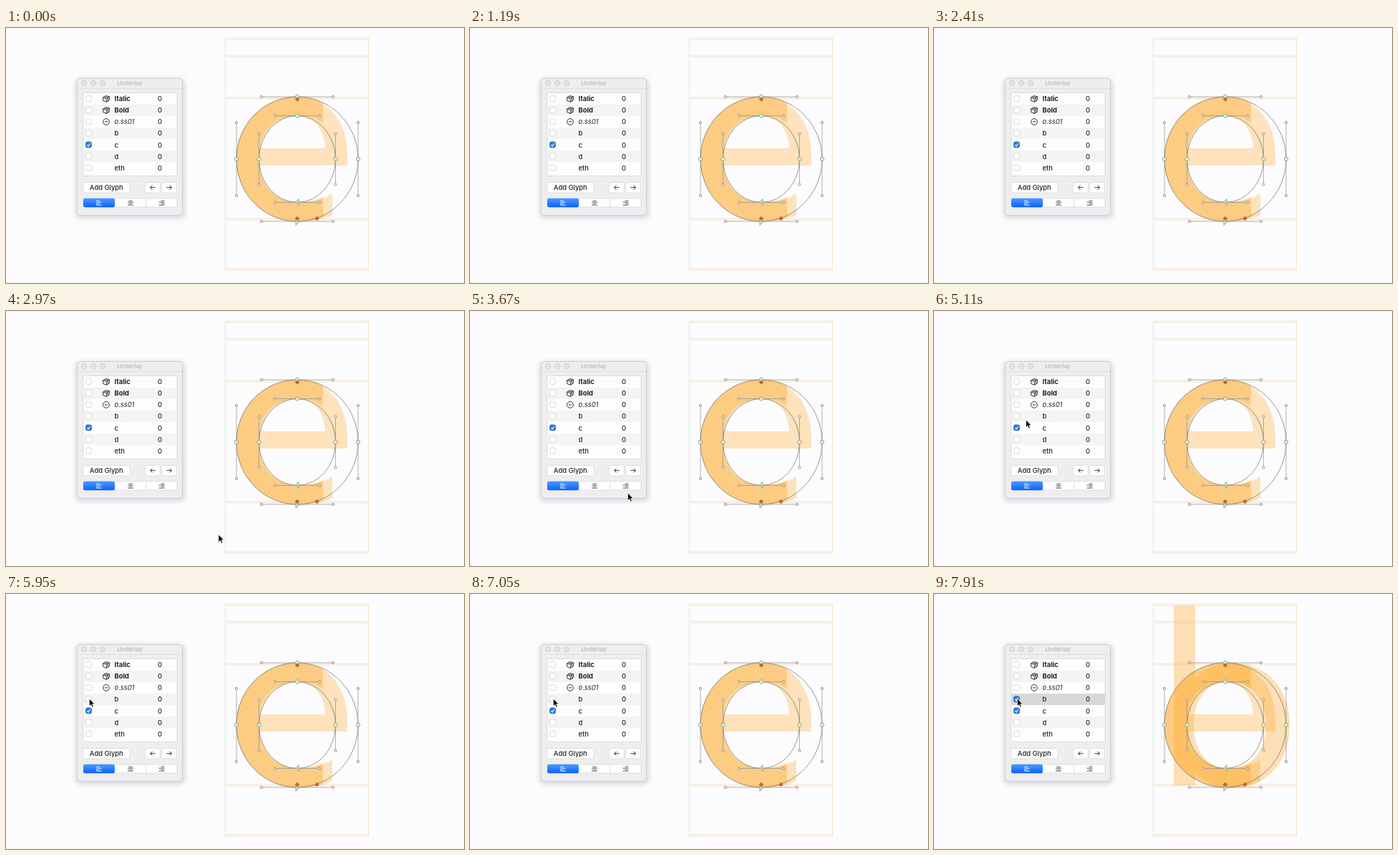
These frames come from a looping animation (640 by 356 pixels, 8000 ms). An HTML page:

```html
<!DOCTYPE html>
<html lang="en">
<head>
<meta charset="utf-8">
<title>Glyph underlay</title>
<style>
html, body { margin: 0; width: 100%; height: 100%; overflow: hidden; background: #fcfcfe; }
svg { display: block; width: 100%; height: 100%; }
text { font: 500 9.4px Inter, "Open Sans", sans-serif; fill: #222; }
.bold { font-weight: 700; }
.italic { font-style: italic; font-weight: 400; }
.title { font-size: 8.2px; fill: #b6b6b8; }
.line { fill: none; stroke: #6c6a68; stroke-width: .7; }
.handle { fill: none; stroke: #92908e; stroke-width: .7; }
.icon { fill: none; stroke: #333; stroke-width: 1; stroke-linejoin: round; }
</style>
</head>
<body>
<svg viewBox="0 0 640 356">
  <defs>
    <linearGradient id="blue" x2="0" y2="1">
      <stop stop-color="#4c9bff"/><stop offset="1" stop-color="#0a63fa"/>
    </linearGradient>
    <filter id="soft" x="-10%" y="-10%" width="120%" height="120%"><feGaussianBlur stdDeviation="3"/></filter>
  </defs>
  <rect width="640" height="356" fill="#fcfcfe"/>
  <g id="guides"></g>
  <g fill="#fda827">
    <path opacity=".31" fill-rule="evenodd" d="M477 192V178C477 128 449 96 407 96C360 96 322 135 322 183S360 270 407 270C426 270 443 268 456 261V231C442 240 427 243 407 243C379 243 356 224 354 192ZM354 168H446C445 141 431 123 405 123C378 123 357 141 354 168Z"/>
    <path opacity=".38" d="M443 104C432 99 420 96 407 96C360 96 322 135 322 183S360 270 407 270C421 270 433 268 443 264V236C433 241 421 243 407 243C377 243 353.500 217 353.500 183S377 122.500 407 122.500C422 122.500 434 126 443 133Z"/>
    <path id="b" opacity=".34" fill-rule="evenodd" d="M335 16H365V119C378 104 396 96 416 96C465 96 497 132 497 183S465 271 416 271C395 271 377 263 365 247V267H335ZM413 122C383 122 363 146 363 183S383 244 413 244S464 219 464 183S443 122 413 122Z"/>
  </g>
  <g id="outline"></g>
  <g id="panel"></g>
  <path id="cursor" d="M0 0V10.800L2.500 8.500L4.200 12.200L6 11.400L4.400 7.800H7.700Z" fill="#000" stroke="#fff" stroke-width=".8" stroke-linejoin="round"/>
</svg>
<script>
const LOOP = 8000, CLICK = 7620;
const $ = id => document.getElementById(id);

function add(parent, tag, attrs, text) {
  const el = document.createElementNS("http://www.w3.org/2000/svg", tag);
  for (const k in attrs) el.setAttribute(k, attrs[k]);
  if (text !== undefined) el.textContent = text;
  parent.appendChild(el);
  return el;
}
const rect = (parent, x, y, width, height, fill, rest) =>
  add(parent, "rect", { x, y, width, height, fill, ...rest });
const circle = (parent, cx, cy, r, fill, stroke, width = 1) =>
  add(parent, "circle", { cx, cy, r, fill, stroke, "stroke-width": width });
const path = (parent, d, cls) => add(parent, "path", { d, class: cls });

function drawGuides() {
  const g = $("guides");
  for (const y of [0, 355]) rect(g, 0, y, 640, 1, "#f7f7f4");
  for (const y of [13, 37.5, 96, 265, 335]) rect(g, 306, y, 201, 4, "#f8efe6");
  for (const x of [306, 506]) rect(g, x, 13, 1, 326, "#f6e3c8");
}

function drawOutline() {
  const g = $("outline"), cx = 407, cy = 183;
  const green = (x, y) => circle(g, x, y, 2.7, "#eef4e6cc", "#6fae8c", .9);
  const handle = (x, y, dx, dy) => {
    path(g, `M${x - dx} ${y - dy}L${x + dx} ${y + dy}`, "handle");
    for (const s of [-1, 1]) circle(g, x + s * dx, y + s * dy, 1.6, "#fcfcfc", "#777", .8);
  };
  const arrow = (x, y, s) =>
    add(g, "path", { d: `M${x - 2 * s} ${y}L${x + 2 * s} ${y - 4.5}V${y + 4.5}Z`, fill: "#d5e4c4", stroke: "#6fae8c", "stroke-width": .9 });

  for (const [rx, ry, hx, hy] of [[85, 87, 50, 51], [53.5, 60.5, 31, 35.5]]) {
    add(g, "ellipse", { cx, cy, rx, ry, class: "line" });
    for (const s of [-1, 1]) {
      handle(cx, cy + s * ry, hx, 0);
      handle(cx + s * rx, cy, 0, hy);
      green(cx + s * rx, cy);
    }
    green(cx, cy - ry);
  }
  arrow(cx, 243, 1);
  arrow(cx, 271, -1);
  for (const [x, y] of [[407, 99.5], [407, 266], [434.5, 266]])
    add(g, "path", { d: `M${x} ${y - 3.3}l3.300 3.300l-3.300 3.300l-3.300-3.300z`, fill: "#b9693f" });
}

function checkbox(parent, y, on) {
  const g = add(parent, "g", {});
  rect(g, 111.500, y - 4.200, 8, 8, on ? "#2a78d8" : "#fff", { rx: 2, stroke: on ? "#2a6dc4" : "#d0d0d2", "stroke-width": .8 });
  if (on) add(g, "path", { d: `M113.400 ${y}l1.600 1.900l2.800-4`, fill: "none", stroke: "#fff", "stroke-width": 1.2 });
  return g;
}

function drawPanel() {
  const g = $("panel");
  const edge = { rx: 2.5, stroke: "#d8d8da", "stroke-width": .8 };
  rect(g, 97, 70, 153, 196, "#d9d9df", { rx: 8, filter: "url(#soft)" });
  rect(g, 99.5, 70.5, 147, 191, "#eeeef0", { rx: 5, stroke: "#cfcfd2" });
  path(g, "M100 84.500H246", "").setAttribute("stroke", "#dfdfe2");
  for (const x of [109, 122, 135]) circle(g, x, 77, 3.7, "#e3e3e5", "#cbcbce", .8);
  add(g, "text", { x: 173, y: 80, "text-anchor": "middle", class: "title" }, "Underlay");

  rect(g, 108, 90.5, 131, 116, "#fdfdfe", { stroke: "#d8d8da", "stroke-width": .8 });
  const rows = [["Italic", "bold"], ["Bold", "bold"], ["o.ss01", "italic"], ["b"], ["c"], ["d"], ["eth"]];
  const marks = {};
  rows.forEach(([name, cls = ""], i) => {
    const y = 98.7 + i * 16.1;
    if (i % 2) rect(g, 108.5, y - 8, 130, 16, "#f4f4f6");
    if (name === "b") marks.row = rect(g, 108, y - 8, 131, 16, "#d8d8d8");
    checkbox(g, y, name === "c");
    if (name === "b") marks.check = checkbox(g, y, true);
    if (i < 2) {
      path(g, `M135.600 ${y - 1.8}l4.200-2.400l4.800 1.500v4.600l-4.200 2.700l-4.800-1.800zl4.800 1.600l4.200-3M140.400 ${y - .2}v4.800M137.800 ${y - 3}l4.700 1.600v4.700`, "icon");
    } else if (i === 2) {
      circle(g, 140, y, 4.4, "none", "#333");
      path(g, `M137.800 ${y}h4.400`, "icon");
    }
    add(g, "text", { x: 151.5, y: y + 3.4, class: cls }, name);
    add(g, "text", { x: 215, y: y + 3.4, "text-anchor": "middle" }, "0");
  });

  const button = (x, w) => rect(g, x, 215.5, w, 14.5, "#fefefe", edge);
  button(108, 65);
  add(g, "text", { x: 140.3, y: 226.2, "text-anchor": "middle" }, "Add Glyph");
  button(194.5, 21);
  button(217.5, 21);
  path(g, "M208.500 222.700h-7m3-2.800l-3 2.800l3 2.800M224.500 222.700h7m-3-2.800l3 2.800l-3 2.800", "icon");

  rect(g, 108, 238, 131, 12, "#fefefe", edge);
  rect(g, 108, 237.7, 44, 12.5, "url(#blue)", { rx: 2.5 });
  rect(g, 195, 238, 1, 12, "#e0e0e3");
  // Paragraph alignment symbols: left, centre, right
  [130, 174, 217.5].forEach((x, k) => {
    [5, 8, 5, 8].forEach((w, j) => {
      rect(g, x - 4 + (8 - w) * k / 2, 240.7 + j * 2, w, 1, k ? "#626264" : "#dcebfd");
    });
  });
  return marks;
}

// Pointer stops: time, x, y
const stops = [[2420, 366, 358], [3390, 246, 277], [3670, 220.5, 254], [5110, 128.5, 152], [5750, 116.3, 146]];

function pointer(t) {
  const last = stops.length - 1;
  if (t <= stops[0][0]) return [366, 370];
  if (t >= stops[last][0]) return stops[last].slice(1);
  const i = stops.findIndex(s => s[0] > t) - 1;
  const p = stops[i], q = stops[i + 1], span = q[0] - p[0], u = (t - p[0]) / span;
  const slope = (k, a) => {
    if (k === last) return 0;
    const m = stops[Math.max(k - 1, 0)], n = stops[k + 1];
    return (n[a] - m[a]) / (n[0] - m[0]) * span;
  };
  return [1, 2].map(a =>
    p[a] * (1 + 2 * u) * (1 - u) ** 2 + slope(i, a) * u * (1 - u) ** 2 +
    q[a] * u * u * (3 - 2 * u) + slope(i + 1, a) * u * u * (u - 1));
}

drawGuides();
drawOutline();
const marks = drawPanel();

function render(t) {
  const shown = t >= CLICK ? "inline" : "none";
  for (const el of [$("b"), marks.row, marks.check]) el.setAttribute("display", shown);
  $("cursor").setAttribute("transform", `translate(${pointer(t).map(v => v.toFixed(2))})`);
}

const start = performance.now();
function tick(now) {
  render(Math.max(0, now - start) % LOOP);
  requestAnimationFrame(tick);
}
render(0);
requestAnimationFrame(tick);
</script>
</body>
</html>
```
